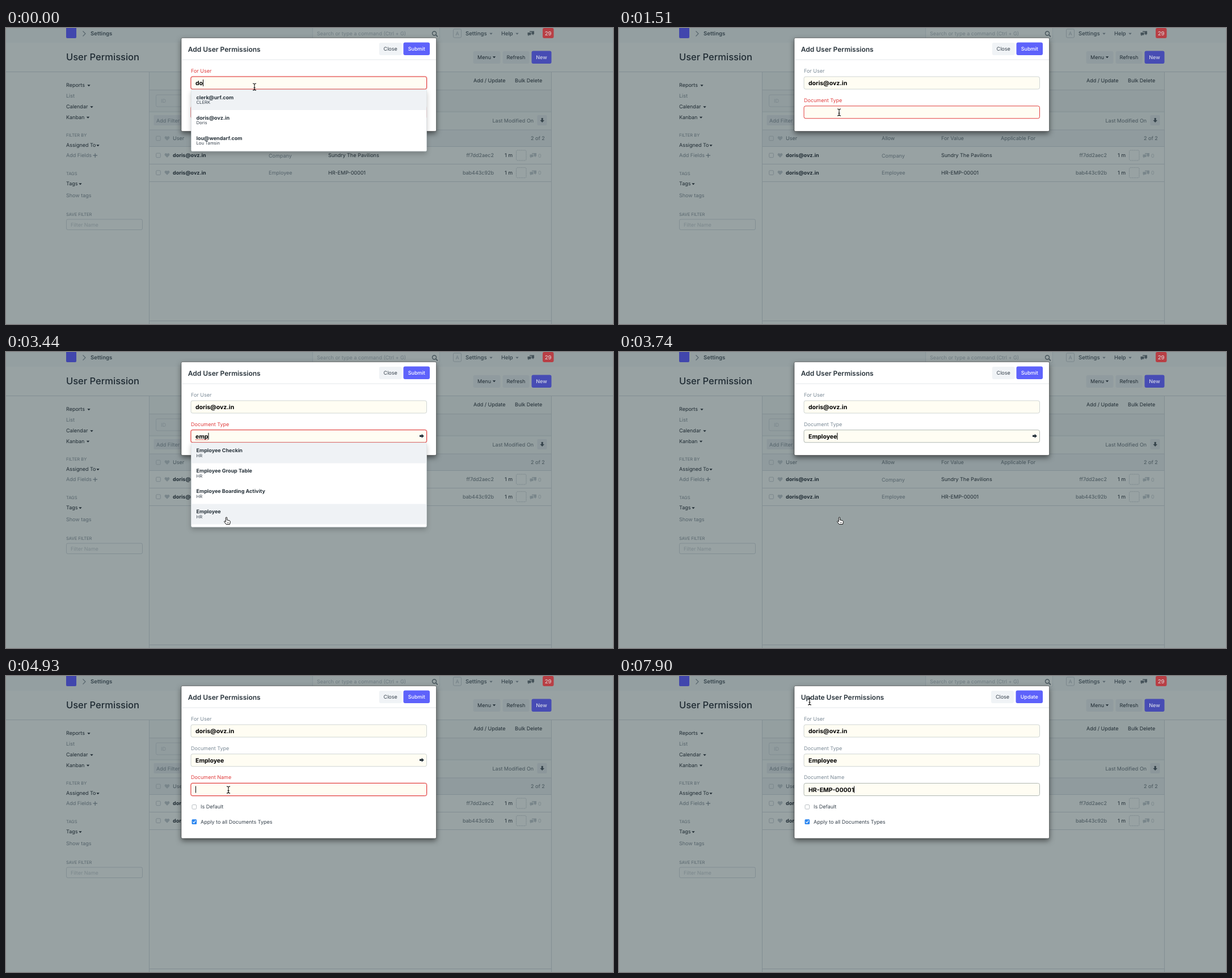
Write an HTML page that moves like this. It is 1070 px wide and 523 px high and loops after 8 s.

```html
<!DOCTYPE html>
<html lang="en">
<head>
<meta charset="utf-8">
<title>User Permission</title>
<style>
html, body { margin: 0; width: 100%; height: 100%; overflow: hidden; background: #98a2a3; }
svg { display: block; width: 1070px; height: 523px; }
text { font-family: Inter, Roboto, sans-serif; font-optical-sizing: none; text-rendering: geometricPrecision; white-space: pre; }
.modal { filter: drop-shadow(0 4px 5px rgba(0,0,0,.5)); }
.menu { filter: drop-shadow(0 4px 4px rgba(0,0,0,.22)); }
</style>
</head>
<body>
<svg viewBox="0 0 1070 523"><g id="page"></g><g id="dialog"></g></svg>
<script>
const LOOP = 8000;
const DARK = '#1f2b33', MUTED = '#56646c', FAINT = '#7b878c', LINE = '#828e93', RED = '#e03c3c';
const USER = 'doris@ovz.in', FIRST = 'Doris', DOC = 'HR-EMP-00001';

// Drawing helpers; text is placed by the middle of its capitals
const text = (x, y, s, o = {}) => {
  const { size = 9, w = 400, fill = DARK, at = 'start' } = o;
  return `<text x="${x}" y="${y + size * .36}" font-size="${size}" font-weight="${w}" fill="${fill}" text-anchor="${at}">${s}</text>`;
};
const rect = (x, y, w, h, fill, stroke = 'none', r = 0, extra = '') =>
  `<rect x="${x}" y="${y}" width="${w}" height="${h}" rx="${r}" fill="${fill}" stroke="${stroke}" ${extra}/>`;
const path = (d, fill, extra = '') => `<path d="${d}" fill="${fill}" ${extra}/>`;
const stroke = (d, color, width = 1) => path(d, 'none', `stroke="${color}" stroke-width="${width}"`);
const caretDown = (x, y, fill = DARK) => path(`M${x - 2.7} ${y - 1.2}h5.4l-2.7 2.9z`, fill);
const bubbles = (x, y, fill) =>
  path(`M${x - 2} ${y - 4}h8v5.5h-1.5v2l-2-2h-1v-4h-3.5z`, fill) +
  path(`M${x - 5.5} ${y - 1.5}h6v4.5h-3l-2 1.8v-1.8h-1z`, fill);
const heart = (x, y) =>
  path(`M${x} ${y + 4}l-4-4c-1.5-2.5 1.8-5.5 4-2.6c2.2-2.9 5.5.1 4 2.6z`, '#78858a');
const box = (x, y) => rect(x - 3.8, y - 3.8, 7.6, 7.6, 'none', FAINT, 1.2);

function drawPage() {
  let s = rect(0, 0, 1070, 523, '#98a2a3') + rect(0, 0, 1070, 26, '#949fa1');
  // Navigation bar
  s += rect(106, -2, 18, 20, '#4146ad', 'none', 2);
  s += stroke('M135.5 5.5l4.5 4.5l-4.5 4.5', MUTED, 1.1);
  s += text(149, 10, 'Settings', { size: 9.6, w: 600, fill: '#35434b' });
  s += rect(540.5, -6, 224, 25, '#98a2a3', '#89959a', 2);
  s += text(548, 10, 'Search or type a command (Ctrl + G)', { fill: '#6f7c82' });
  s += `<circle cx="755" cy="9.5" r="3.5" fill="none" stroke="#46545b" stroke-width="1.4"/>` + stroke('M757.6 12l3.2 3.4', '#46545b', 1.7);
  s += rect(788.5, 2, 14, 15, 'none', FAINT, 2) + text(795.5, 10, 'A', { fill: '#6f7c82', at: 'middle' });
  s += text(810, 9.7, 'Settings', { size: 9.6, w: 500, fill: '#35434b' }) + caretDown(855, 10, MUTED);
  s += text(873, 9.7, 'Help', { size: 9.4, w: 500, fill: '#35434b' }) + caretDown(901, 10, MUTED);
  s += bubbles(925, 9.5, '#46545b');
  s += rect(946, 0, 19.5, 18, '#b83f45', 'none', 3) + text(955.7, 9.5, '29', { size: 9.6, w: 500, fill: '#d9c9cb', at: 'middle' });
  // Title bar
  s += text(106, 51.3, 'User Permission', { size: 16.5, w: 500 });
  s += rect(823.5, 41, 48, 22, '#909b9f', 'none', 3) + text(831, 51.5, 'Menu') + caretDown(860.5, 51.5);
  s += rect(875.5, 41, 47, 22, '#909b9f', 'none', 3) + text(882.5, 51.5, 'Refresh');
  s += rect(926.5, 40.5, 35, 22.5, '#474cb4', 'none', 3) + text(944, 51.5, 'New', { w: 500, fill: '#d5d8e8', at: 'middle' });
  // Sidebar
  for (const [y, label, cx] of [[101, 'Reports', 146], [139, 'Calendar', 151], [157.5, 'Kanban', 144.5], [207, 'Assigned To', 162], [275, 'Tags', 131]])
    s += text(106, y, label) + caretDown(cx, y + .5);
  for (const [y, label] of [[119.3, 'List'], [225, 'Add Fields'], [295.5, 'Show tags']]) s += text(106, y, label, { fill: MUTED });
  s += stroke('M153.5 225.2h7.5M157.2 221.5v7.5', MUTED, 1.2);
  for (const [y, label] of [[189.5, 'FILTER BY'], [257, 'TAGS'], [329, 'SAVE FILTER']]) s += text(106, y, label, { size: 7.5, fill: MUTED });
  s += rect(106.5, 338, 134, 18.5, 'none', LINE, 2.5) + text(114, 347.3, 'Filter Name', { fill: FAINT });
  // List
  s += rect(253, 78, 708, 102, '#949fa0') + rect(253, 110, 708, 38, '#919c9e') + rect(253, 180, 708, 29, '#909b9e');
  s += stroke('M0 77.5H1070M252.5 78V523M961.5 78V523M253 109.5H961M253 148H961M253 180H961M253 209.5H961M253 240.5H961M253 271.5H961M253 517.5H961', LINE);
  s += text(824, 93, 'Add / Update') + text(897, 93, 'Bulk Delete');
  s += rect(264.5, 118, 90, 21, 'none', LINE, 2.5) + text(273, 128.7, 'ID', { fill: FAINT });
  s += rect(260.5, 154, 60, 18, '#8c979b', 'none', 2) + text(265, 163.5, 'Add Filter', { fill: MUTED });
  s += text(857.5, 163.5, 'Last Modified On', { fill: '#46545b' }) + rect(936.5, 154, 17, 18, '#8c979b', 'none', 2);
  s += path('M943.7 159h3v4h2.3l-3.8 4l-3.8-4h2.3z', '#35434b');
  s += box(268.5, 195) + heart(284, 195);
  for (const [x, label] of [[294, 'User'], [463, 'Allow'], [568, 'For Value'], [673, 'Applicable For'], [925, '2 of 2']])
    s += text(x, 195, label, { fill: '#46545b' });
  for (const [y, kind, value, id] of [[225, 'Company', 'Sundry The Pavilions', 'ff7dd2aec2'], [255.7, 'Employee', DOC, 'bab443c92b']]) {
    s += box(268.5, y) + heart(284, y) + text(294, y, USER, { w: 700 });
    s += text(463, y + .5, kind, { fill: MUTED }) + text(568, y, value);
    s += text(860, y, id, { fill: '#46545b', at: 'end' }) + text(879, y, '1 m');
    s += rect(899.5, y - 9, 17.5, 18, 'none', FAINT, 2, 'stroke-dasharray="2 1"');
    s += bubbles(929, y, '#78858a') + text(938, y + .3, '0', { fill: FAINT });
  }
  return s;
}

// Instants at which the picture is refreshed: [first, last, count]
const ticks = [[0, 0, 1], [150, 1060, 7], [1210, 1210, 1], [1510, 1510, 1], [1810, 2260, 4], [2710, 3440, 6],
  [3740, 4780, 8], [4930, 4930, 1], [5230, 5230, 1], [5830, 6270, 4], [6570, 6570, 1], [6860, 7900, 8]]
  .flatMap(([a, b, n]) => Array.from({ length: n }, (_, i) => Math.floor((a + (b - a) * i / Math.max(1, n - 1)) / 10) * 10));

// Pointer: time, x, y, shape from that time on
const trail = [[0, 438, 104, 'beam'], [150, 438, 104, 'beam'], [300, 428, 122, 'hand'], [750, 406, 164, 'hand'],
  [900, 406, 165, 'arrow'], [1210, 406, 165, 'arrow'], [1510, 388, 149, 'beam'], [2260, 388, 149, 'beam'],
  [2710, 391, 162, 'hand'], [2850, 391, 162, 'hand'], [3440, 388.5, 292, 'hand'], [3740, 388.5, 292, 'hand'],
  [3880, 388, 291.5, 'arrow'], [4030, 388, 290, 'arrow'], [4620, 391, 203, 'beam'], [4780, 392, 201, 'beam'],
  [5830, 393, 203, 'beam'], [5970, 395, 216, 'hand'], [6270, 398.5, 226.5, 'hand'], [6570, 398.5, 226.5, 'arrow'],
  [6860, 398, 230, 'arrow'], [7000, 396, 250, 'arrow'], [7750, 338, 52, 'beam'], [7900, 336, 45, 'beam'], [LOOP, 336, 45, 'beam']];

function pointer(t) {
  const i = trail.findLastIndex(p => p[0] <= t);
  const [a, x, y, shape] = trail[i], [b, x2, y2] = trail[Math.min(i + 1, trail.length - 1)];
  const u = b > a ? (t - a) / (b - a) : 0, e = u * u * (3 - 2 * u);
  return { x: x + (x2 - x) * e, y: y + (y2 - y) * e, shape };
}

const edge = 'stroke="#fff" stroke-width=".8" stroke-linejoin="round"';
const shapes = {
  beam: stroke('M-3-6q3 0 3 2v8q0 2-3 2M3-6q-3 0-3 2v8q0 2 3 2M-1.5 1.5h3', '#111', 1.1),
  arrow: path('M0 0V11L2.5 8.7L4.3 12.8L6.1 12L4.3 8.1H7.8z', '#111', edge),
  hand: path('M-1.2 1C-1.2-.4 1.2-.4 1.2 1V5l1.5.2l1.8.4l1.6.8c1 .5.9 1.5.7 2.6l-.9 3.5H-.4L-3.6 8.2c-.8-1 .4-2 1.3-1.2L-1.2 8z', '#fff', 'stroke="#111" stroke-width="1" stroke-linejoin="round"') +
    stroke('M1.6 8.2v2.6M3.6 8.2v2.6', '#111', .6)
};

const pen = document.createElement('canvas').getContext('2d');
function valueEnd(s) {
  pen.font = '700 10.5px Inter, Roboto, sans-serif';
  return 334 + pen.measureText(s).width;
}

function field(y, label, { value = '', error, focus, caret, link, typo }) {
  const color = error ? RED : focus ? '#b0b7b2' : '#cfd5d3';
  let s = text(326, y - 21.5, label, { fill: error ? RED : '#7b8a96' });
  if (focus && error) s += rect(325.5, y - 11.5, 416.5, 23, 'none', 'rgba(224,60,60,.3)', 3.5, 'stroke-width="1.6"');
  s += rect(326, y - 11, 415.5, 22, '#fffdf3', color, 3) + text(334, y + .6, value, { size: 10.5, w: 700, fill: '#000' });
  const end = valueEnd(value);
  if (typo) s += path(`M334 ${y + 6}H${end}`, 'none', `stroke="${RED}" stroke-width="1.3" stroke-dasharray="1.5 1"`);
  if (caret) s += stroke(`M${end + .5} ${y - 6}v12`, '#000');
  if (link) s += path(`M729 ${y - 2}h3.7v-2l4.2 3.6l-4.2 3.6v-2h-3.7z`, '#25313a');
  return s;
}

function menu(y, items, p, rest = 0) {
  const h = items.length * 36 + rest + .8;
  let s = rect(326.5, y, 415, h, '#fff', '#d3d9dd', 2, 'stroke-width=".7"');
  items.forEach(([name, note], i) => {
    const top = y + i * 36, over = p.shape === 'hand' && p.y >= top && p.y < top + 36;
    if (i === 0 || over) s += rect(326.8, top, 414.4, 36, '#eff2f5');
    s += text(335.5, top + 13.3, name, { w: 700, fill: '#27323a' }) + text(335.5, top + 22.7, note, { size: 7.7, fill: '#36414c' });
  });
  return `<g class="menu">${s}</g>`;
}

function drawDialog(t) {
  const during = (a, b) => t >= a && t < b;
  const p = pointer(t), tall = t >= 3880, update = t >= 6860;
  let s = `<g class="modal">${rect(309, 17.5, 449.5, tall ? 269.5 : 165, '#fff', 'rgba(0,0,0,.4)', 2)}</g>`;
  s += stroke('M309.5 56H758', '#e3e6e9');
  s += text(320.7, 38, (update ? 'Update' : 'Add') + ' User Permissions', { size: 12, w: 600, fill: '#27323a' });
  const left = update ? 656 : 657.7, go = update ? 699.5 : 700.5;
  s += rect(left, 26, 40, 22, '#f0f3f6', 'none', 3) + text(left + 20, 37, 'Close', { fill: '#36414c', at: 'middle' });
  s += rect(go, 25.5, 747 - go, 22.5, '#5e62fb', 'none', 3) + text((go + 747) / 2, 37, update ? 'Update' : 'Submit', { w: 500, fill: '#fff', at: 'middle' });

  const typed = t < 1960 ? '' : t < 2110 ? 'e' : t < 2260 ? 'em' : t < 3740 ? 'emp' : 'Employee';
  s += field(97, 'For User', { value: t < 900 ? USER.slice(0, 2) : USER, error: t < 1060, focus: t < 1210, caret: t < 1510 });
  s += field(148.8, 'Document Type', {
    value: typed, error: t < 3740, focus: during(1810, 4930), link: during(1960, 5230), typo: during(3000, 3740),
    caret: during(1810, 2710) || during(3000, 4930)
  });
  if (tall) {
    s += field(200.5, 'Document Name', { value: t < 6570 ? '' : DOC, error: !update, focus: t >= 4930, caret: during(4930, 5230) || t >= 6570 });
    s += rect(328, 227.5, 7.6, 7.6, '#fff', '#b9bec2', 1.5) + text(343, 231.2, 'Is Default', { fill: '#36414c' });
    s += rect(327.5, 253.3, 8.6, 8.6, '#2b86f0', 'none', 1.5) + stroke('M329.5 257.6l1.8 2l3-4.2', '#fff', 1.2);
    s += text(343, 257.5, 'Apply to all Documents Types', { fill: '#36414c' });
  }
  if (t < 900) s += menu(109, [['clerk@urf.com', 'CLERK'], [USER, FIRST], ['lou@wendarf.com', 'Lou Tamsin']], p);
  if (during(3000, 3740)) s += menu(160.5, ['Employee Checkin', 'Employee Group Table', 'Employee Boarding Activity', 'Employee'].map(n => [n, 'HR']), p, 4);
  if (during(5830, 6570)) s += menu(212, [[DOC, FIRST]], p);
  return s + `<g transform="translate(${p.x} ${p.y})">${shapes[p.shape]}</g>`;
}

document.getElementById('page').innerHTML = drawPage();
const dialog = document.getElementById('dialog');
let shown = -1;
function frame(now) {
  const t = now % LOOP, tick = ticks.findLast(k => k <= t);
  if (tick !== shown) dialog.innerHTML = drawDialog(shown = tick);
  requestAnimationFrame(frame);
}
frame(0);
</script>
</body>
</html>
```
